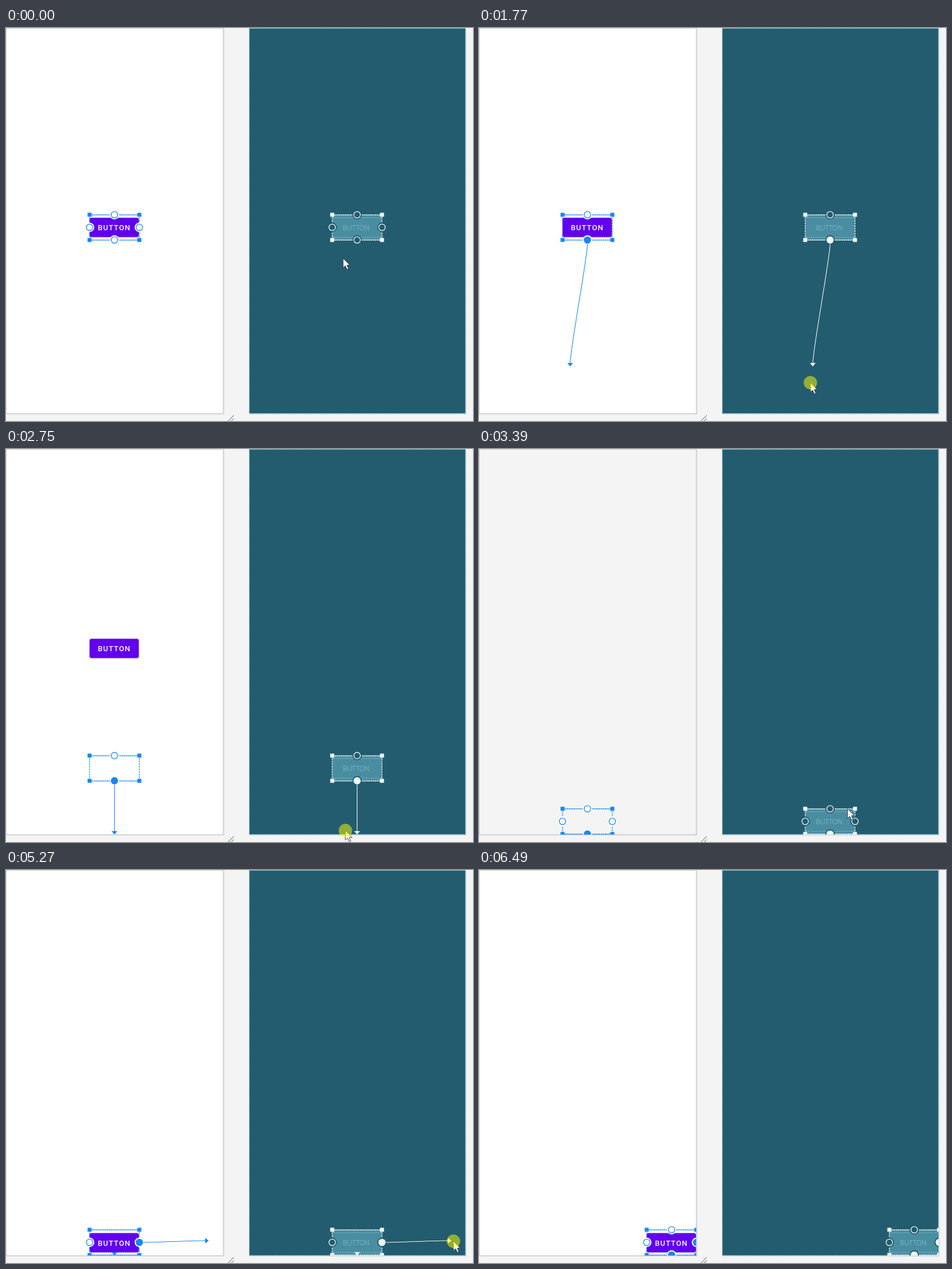
An HTML page with a canvas that plays this animation: 816 by 686 pixels, repeating every 7.02 s.

```html
<!DOCTYPE html>
<html lang="en">
<head>
<meta charset="utf-8">
<title>Constraint editor</title>
<style>
  html, body { margin: 0; width: 100%; height: 100%; overflow: hidden; background: #f4f4f4; }
  canvas { display: block; }
</style>
</head>
<body>
<canvas id="stage" width="816" height="686"></canvas>
<script>
const ctx = document.getElementById('stage').getContext('2d');
const LOOP = 7020;
const WIDGET = { x: 146, y: 326, w: 87, h: 44 };
const SHIFT = { x: 147, y: 302 };
const PANE_DX = 424;

const design = { dx: 0, line: '#1886f5', fill: '#fff', halo: '#fff', right: 379.5 };
const blueprint = { dx: PANE_DX, line: '#eef8fa', fill: '#235c6e', halo: '#235c6e', right: 379 };

// time, x, y of the pointer tip
const pointerPath = [
  [0, 589, 402], [340, 613, 373], [740, 613, 373], [1430, 600, 490], [1770, 579, 619],
  [2190, 589, 654], [2400, 593, 666], [3030, 593, 666], [3390, 644, 628], [3720, 649, 644],
  [4070, 657, 649], [4530, 658, 649], [4730, 662, 650], [5200, 778, 649], [5680, 804, 642],
  [6010, 804, 642], [6350, 838, 646]
];

const drags = [
  { axis: 'y', start: 740, snap: 2530, end: 3040, rendered: 3500 },
  { axis: 'x', start: 4530, snap: 5450, end: 6010, rendered: 6490 }
];
const SNAP_TIME = 350;
const HOVER = { bottom: 270, right: 3930 };
const BLANK = [3250, 3500];

function pointerAt(t) {
  const i = pointerPath.findIndex(p => p[0] > t);
  if (i < 0) return { x: 838, y: 646 };
  if (i === 0) return { x: 589, y: 402 };
  const [t0, x0, y0] = pointerPath[i - 1], [t1, x1, y1] = pointerPath[i];
  const u = (t - t0) / (t1 - t0);
  return { x: x0 + (x1 - x0) * u, y: y0 + (y1 - y0) * u };
}

function snapProgress(drag, t) {
  const u = Math.min(1, Math.max(0, (t - drag.snap) / SNAP_TIME));
  return u * u * (3 - 2 * u);
}

function rect(x, y, w, h, color) {
  ctx.fillStyle = color;
  ctx.fillRect(x, y, w, h);
}

function disc(x, y, r, color) {
  ctx.fillStyle = color;
  ctx.beginPath();
  ctx.arc(x, y, r, 0, Math.PI * 2);
  ctx.fill();
}

function strokeLine(x0, y0, x1, y1, color, width = 1, dash = []) {
  ctx.strokeStyle = color;
  ctx.lineWidth = width;
  ctx.setLineDash(dash);
  ctx.beginPath();
  ctx.moveTo(x0, y0);
  ctx.lineTo(x1, y1);
  ctx.stroke();
  ctx.setLineDash([]);
}

function label(text, x, y, font, color, spacing) {
  ctx.font = font;
  ctx.letterSpacing = spacing;
  ctx.fillStyle = color;
  ctx.fillText(text, x, y);
}

function drawPanes(blank) {
  rect(0, 0, 816, 686, '#f4f4f4');
  rect(1, 1, 381, 674, '#e3e3e3');
  rect(0, 0, 380, 673.5, '#c8c8c8');
  rect(1, 1, 378, 671.5, blank ? '#f4f4f4' : '#fff');

  rect(425, 2, 380, 673, '#dfe3e4');
  rect(424.5, 0, 379, 673.5, '#a9d3dd');
  rect(425.5, 1, 377, 671.5, '#235c6e');
  ctx.strokeStyle = '#4d8797';
  ctx.lineWidth = 1;
  ctx.setLineDash([2, 2]);
  ctx.strokeRect(425.5, 1, 377, 671.5);
  ctx.setLineDash([]);

  strokeLine(388, 686, 398, 676, '#435660');
  strokeLine(393.5, 686, 398, 681.5, '#435660');
}

function drawButton(dx, dy) {
  const x = WIDGET.x + dx, y = WIDGET.y + 5.3 + dy;
  ctx.fillStyle = '#6200ee';
  ctx.shadowColor = 'rgba(0,0,0,.3)';
  ctx.shadowBlur = 2;
  ctx.shadowOffsetY = 1;
  ctx.beginPath();
  ctx.roundRect(x, y, 86, 33.4, 3.5);
  ctx.fill();
  ctx.shadowColor = 'transparent';
  label('BUTTON', x + 14.4, y + 21.7, '500 13px Roboto, sans-serif', '#fff', '1.15px');
}

function drawBlueprintWidget(box) {
  rect(box.x, box.y, box.w, box.h, '#4b8da0');
  strokeLine(box.x, box.y + 5, box.x + box.w, box.y + 5, '#6aa9ba');
  strokeLine(box.x, box.y + 39.5, box.x + box.w, box.y + 39.5, '#6aa9ba');
  label('BUTTON', box.x + 18.5, box.y + 27, '300 12px "Open Sans", sans-serif', '#84c8dc', '0px');
}

function drawHandle(theme, x, y, filled) {
  disc(x, y, 8.3, theme.halo);
  disc(x, y, 6.3, theme.line);
  if (!filled) disc(x, y, 5, theme.fill);
}

function arrowHead(x, y, axis, color) {
  ctx.save();
  ctx.translate(x, y);
  if (axis === 'x') ctx.rotate(-Math.PI / 2);
  ctx.fillStyle = color;
  ctx.beginPath();
  ctx.moveTo(-5, -6);
  ctx.lineTo(5, -6);
  ctx.lineTo(0, 0);
  ctx.fill();
  ctx.restore();
}

function drawArrow(theme, from, tip, axis, snapped) {
  const reach = tip[axis] - from[axis];
  if (reach > 13) {
    const bend = Math.min(30, reach / 3);
    const bx = axis === 'x' ? bend : 0, by = axis === 'y' ? bend : 0;
    ctx.strokeStyle = theme.line;
    ctx.lineWidth = 1.1;
    ctx.beginPath();
    ctx.moveTo(from.x + bx / bend * 7, from.y + by / bend * 7);
    ctx.bezierCurveTo(from.x + bx, from.y + by, tip.x - bx, tip.y - by,
      tip.x - bx / bend * 5, tip.y - by / bend * 5);
    ctx.stroke();
  }
  if (snapped || reach > 13) arrowHead(tip.x, tip.y, axis, theme.line);
}

function drawSelection(theme, box, t, drag) {
  const { x, y, w, h } = box, cx = x + w / 2, cy = y + h / 2;
  ctx.save();
  ctx.translate(theme.dx, 0);
  ctx.beginPath();
  ctx.rect(0, 0, theme.right, 673);
  ctx.clip();

  if (theme === blueprint) drawBlueprintWidget(box);
  for (const ey of [y, y + h]) strokeLine(x, ey + .3, x + w, ey + .3, theme.line, 1.4, [3, .7]);
  for (const ex of [x, x + w]) strokeLine(ex, y, ex, y + h, theme.line, 1.3, [3, 1.5]);
  for (const ex of [x, x + w])
    for (const ey of [y, y + h]) rect(ex - 3.5, ey - 3.5, 7, 7, theme.line);

  const vertical = !drag || drag.axis === 'y', horizontal = !drag || drag.axis === 'x';
  if (vertical) {
    drawHandle(theme, cx, y, false);
    drawHandle(theme, cx, y + h, t >= HOVER.bottom);
  } else {
    arrowHead(cx, 673, 'y', theme.line);
  }
  if (horizontal) {
    drawHandle(theme, x, cy, false);
    drawHandle(theme, x + w, cy, t >= HOVER.right);
  }

  if (drag) {
    const from = drag.axis === 'y' ? { x: cx, y: y + h } : { x: x + w, y: cy };
    const snapped = t >= drag.snap;
    const lagged = pointerAt(Math.max(drag.start, t - 70));
    let tip = { x: lagged.x - PANE_DX, y: lagged.y - 2 };
    if (snapped) tip = drag.axis === 'y' ? { x: cx, y: 673 } : { x: 379, y: cy };
    drawArrow(theme, from, tip, drag.axis, snapped);
  }
  ctx.restore();
}

function drawPointer(p, pressed) {
  const outline = [[0, 0], [0, 16.5], [3.9, 13], [6.8, 19.5], [9.5, 18.3], [6.7, 12], [11.7, 12]];
  ctx.beginPath();
  for (const [x, y] of outline) ctx.lineTo(p.x + x, p.y + y);
  ctx.closePath();
  ctx.fillStyle = '#fff';
  ctx.fill();
  ctx.strokeStyle = '#26343a';
  ctx.lineWidth = .9;
  ctx.stroke();
  if (pressed) disc(p.x, p.y, 11.7, 'rgba(255,255,0,.5)');
}

function draw(t) {
  const [down, across] = drags;
  const drag = drags.find(d => t >= d.start && t < d.end);
  const blank = t >= BLANK[0] && t < BLANK[1];
  const box = {
    ...WIDGET,
    x: WIDGET.x + SHIFT.x * snapProgress(across, t),
    y: WIDGET.y + SHIFT.y * snapProgress(down, t)
  };

  drawPanes(blank);
  if (!blank) {
    ctx.save();
    ctx.beginPath();
    ctx.rect(0, 0, 379, 673);
    ctx.clip();
    drawButton(t >= across.rendered ? SHIFT.x : 0, t >= down.rendered ? SHIFT.y + .5 : 0);
    ctx.restore();
  }
  drawSelection(design, box, t, drag);
  drawSelection(blueprint, box, t, drag);
  drawPointer(pointerAt(t), !!drag);
}

const begin = performance.now();
function tick() {
  draw((performance.now() - begin) % LOOP);
  requestAnimationFrame(tick);
}
tick();
</script>
</body>
</html>
```
